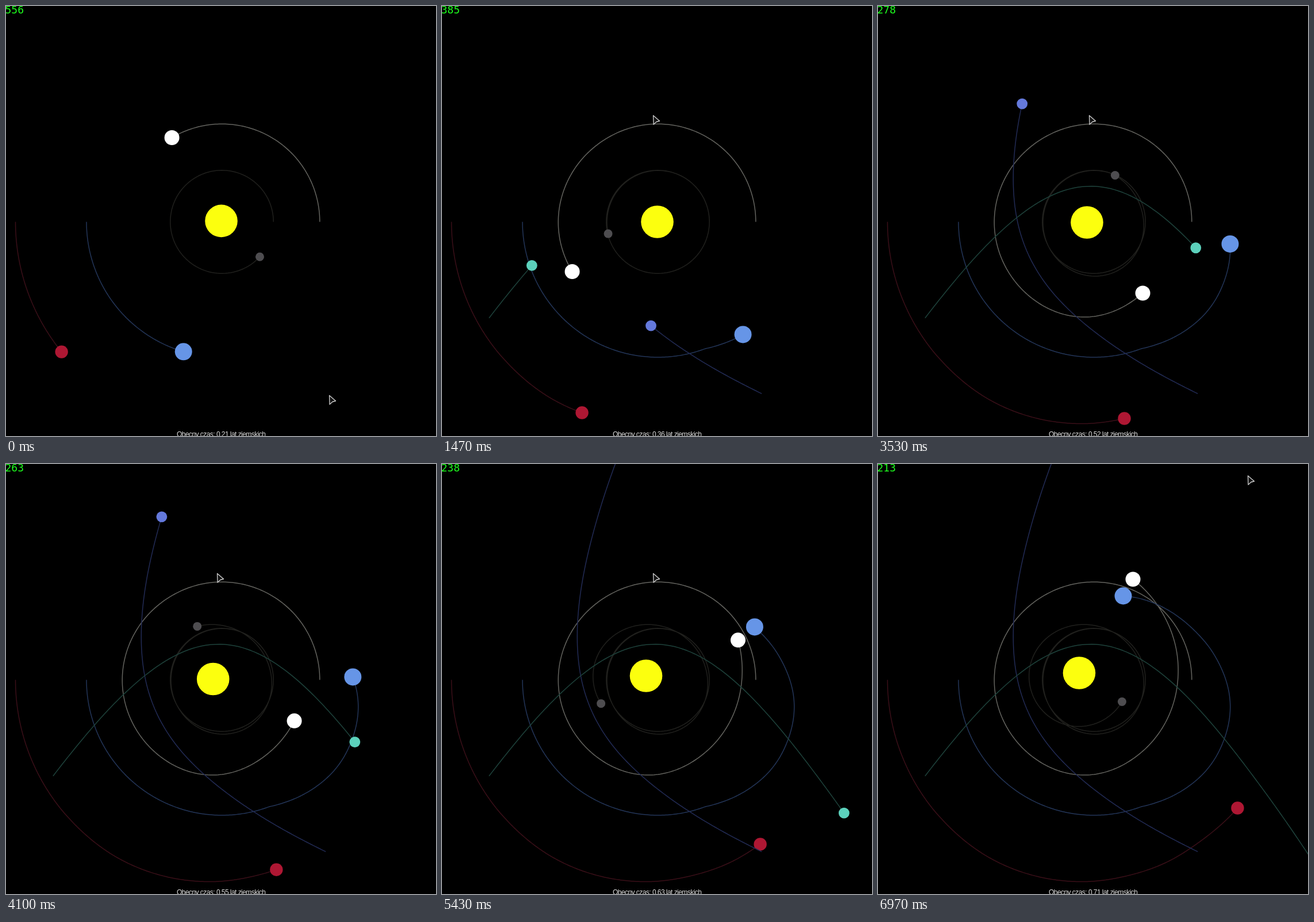
Animation, 748 px wide and 748 px high, one loop 7010 ms. Source, as an HTML page with a canvas:

```html
<!DOCTYPE html>
<html lang="pl">
<head>
<meta charset="utf-8">
<title>Orbity</title>
<style>
  html, body { margin: 0; width: 100%; height: 100%; overflow: hidden; background: #000; }
  canvas, svg { position: absolute; left: 0; top: 0; width: 748px; height: 748px; display: block; }
  #fps { font: 18px "DejaVu Sans Mono", "Noto Sans Mono", monospace; fill: #1eff1e; }
  #clock { font: 12px "Liberation Sans", Arial, sans-serif; letter-spacing: -0.55px; fill: #dcdcdc; }
</style>
</head>
<body>
<canvas id="sky" width="748" height="748"></canvas>
<svg viewBox="0 0 748 748">
  <text id="fps" x="-1.5" y="13"></text>
  <text id="clock" x="297" y="748.5"></text>
</svg>
<script>
const LOOP = 7010, STEP = 100 / 3, LAST = 209;
const TAU = 2 * Math.PI, RAD = Math.PI / 180;
const HOME = 375, AU = 235.5;
const GRAVITY = TAU * TAU * AU ** 3; // pixels cubed per year squared

const ctx = document.getElementById('sky').getContext('2d');
const fpsText = document.getElementById('fps');
const clockText = document.getElementById('clock');

// Each simulation step costs more as the trails grow, so years pass ever slower.
const stepCost = t => Math.sqrt(3.24 + 2.76 * t / 1000);
const yearAt = t => .211 + .169 * (stepCost(t) - 1.8);

const polar = (x, y, angle, r) => [x + r * Math.cos(angle), y - r * Math.sin(angle)];

// Cubic Hermite curve through rows of [p, a, b], uneven spacing.
function spline(rows) {
  const end = rows.length - 1;
  const slope = (i, k) => (rows[i + 1][k] - rows[i][k]) / (rows[i + 1][0] - rows[i][0]);
  const tangent = (i, k) => {
    if (i === 0) return slope(0, k);
    if (i === end) return slope(end - 1, k);
    const before = rows[i][0] - rows[i - 1][0], after = rows[i + 1][0] - rows[i][0];
    return (slope(i - 1, k) * after + slope(i, k) * before) / (before + after);
  };
  const tangents = rows.map((_, i) => [0, tangent(i, 1), tangent(i, 2)]);
  return p => {
    let i = 0;
    while (i < end - 1 && p >= rows[i + 1][0]) i++;
    const a = rows[i], b = rows[i + 1];
    const h = b[0] - a[0], s = (p - a[0]) / h, r = 1 - s;
    return [1, 2].map(k => a[k] * (1 + 2 * s) * r * r + b[k] * s * s * (3 - 2 * s)
      + h * s * r * (tangents[i][k] * r - tangents[i + 1][k] * s));
  };
}

// Key points of the disturbed bodies share these years.
const KEYS = [.363, .4474, .5159, .5853, .6284, .7079];
const keyed = points => points.map(([x, y], i) => [KEYS[i], x, y]);

const sunAt = spline([[0, 374, 374], [.3, 374, 374],
  ...keyed([[374, 375], [369.5, 379.5], [363, 376], [357, 371], [354.5, 368], [349.5, 363]])]);

// Steady circle until disturbed, then a curve around the drifting sun.
function planet({ start, speed, radius, until = .211, points }) {
  const circle = year => polar(HOME, HOME, (start + speed * year) * RAD, radius);
  let last = -Infinity;
  const rows = [[until, ...circle(until)], ...keyed(points)].map(([year, x, y]) => {
    const [sx, sy] = sunAt(year);
    let angle = Math.atan2(sy - y, x - sx);
    while (last > angle) angle += TAU;
    last = angle;
    return [year, angle, Math.hypot(x - sx, y - sy)];
  });
  const around = spline(rows);
  return year => year < until ? circle(year) : polar(...sunAt(year), ...around(year));
}

// Hyperbolic Kepler flight past the sun; p is the semi-latus rectum.
function flyby({ e, p, axis, nearest, mass }) {
  const a = p / (e * e - 1);
  const rate = Math.sqrt(GRAVITY * mass / a ** 3);
  const widen = Math.sqrt((e + 1) / (e - 1));
  return year => {
    const mean = (year - nearest) * rate;
    let h = Math.asinh(mean / e);
    for (let i = 0; i < 12; i++) h -= (e * Math.sinh(h) - h - mean) / (e * Math.cosh(h) - 1);
    const turn = 2 * Math.atan(widen * Math.tanh(h / 2));
    return polar(...sunAt(year), axis * RAD - turn, p / (1 + e * Math.cos(turn)));
  };
}

const bodies = [
  { born: 0, size: 28.3, color: '#fcff0e', at: sunAt },
  { born: 0, size: 7.5, color: '#4e4d50', trail: '#20201d',
    at: planet({ start: 0, speed: 1504, radius: 89.7,
      points: [[288.5, 395.5], [444, 436], [412, 294], [273.5, 326], [276, 416], [424, 413]] }) },
  { born: 0, size: 13, color: '#ffffff', trail: '#64645f',
    at: planet({ start: 0, speed: 572, radius: 170.3,
      points: [[226, 461.5], [346, 540], [460, 499], [520, 385], [514.5, 306], [443, 200]] }) },
  { born: 0, size: 15, color: '#6695e7', trail: '#233558',
    at: planet({ start: 180, speed: 348.5, radius: AU, until: .317,
      points: [[523, 571], [594.5, 495.5], [612, 413.5], [583.5, 330], [543.5, 283], [426, 229]] }) },
  { born: 0, size: 11.2, color: '#ae1733', trail: '#3a0f18',
    at: planet({ start: 180, speed: 185, radius: 359,
      points: [[243, 707], [346, 726], [428, 717], [508, 689], [553, 661], [625, 598]] }) },
  { born: .262, size: 9.4, color: '#6479dc', trail: '#222b55',
    at: flyby({ e: 1.24, p: 274, axis: -159, nearest: .423, mass: 1.01 }) },
  { born: .3105, size: 9.4, color: '#5cd1bc', trail: '#1e423b',
    at: flyby({ e: 1.155, p: 143.3, axis: 90, nearest: .448, mass: 1.05 }) }
];

// Pointer stops: arrival time and place, each reached by one quick move.
const STOPS = [[420, 557, 673], [880, 81, 544], [1370, 367, 190], [6600, 643, 20]];
const MOVE = 400;

function pointerAt(t) {
  let x = 562, y = 677;
  for (const [arrival, toX, toY] of STOPS) {
    const s = Math.min(1, Math.max(0, 1 - (arrival - t) / MOVE));
    const eased = s * s * (3 - 2 * s);
    x += (toX - x) * eased;
    y += (toY - y) * eased;
  }
  return [x, y];
}

function drawTrail(body, year) {
  ctx.beginPath();
  for (let p = body.born; p < year; p += .002) ctx.lineTo(...body.at(p));
  ctx.lineTo(...body.at(year));
  ctx.strokeStyle = body.trail;
  ctx.lineWidth = 1.5;
  ctx.stroke();
}

function drawBody(body, year) {
  if (year < body.born) return;
  if (body.trail) drawTrail(body, year);
  ctx.beginPath();
  ctx.arc(...body.at(year), body.size, 0, TAU);
  ctx.fillStyle = body.color;
  ctx.fill();
}

function drawPointer(x, y) {
  ctx.beginPath();
  for (const [dx, dy] of [[0, 0], [11, 9.5], [5.5, 11], [.5, 15.5]]) ctx.lineTo(x + dx, y + dy);
  ctx.closePath();
  ctx.fillStyle = '#141414';
  ctx.fill();
  ctx.strokeStyle = '#cfcfcf';
  ctx.lineWidth = 1.3;
  ctx.lineJoin = 'round';
  ctx.stroke();
}

function draw(now) {
  const t = Math.min(LAST, Math.floor((now % LOOP + 5) / STEP)) * STEP;
  const year = yearAt(t);
  ctx.setTransform(1, 0, 0, 1, 0, 0);
  ctx.fillStyle = '#000';
  ctx.fillRect(0, 0, 748, 748);
  ctx.translate(.5, .5);
  for (const body of bodies) drawBody(body, year);
  drawPointer(...pointerAt(t));
  // The frame rate averages ten steps, timed in whole milliseconds.
  fpsText.textContent = Math.round(10000 / Math.floor(10 * stepCost(t) + 1e-6));
  clockText.textContent = `Obecny czas: ${year.toFixed(2)} lat ziemskich`;
}

let start;
function tick(now) {
  start ??= now;
  draw(now - start);
  requestAnimationFrame(tick);
}
draw(0);
requestAnimationFrame(tick);
</script>
</body>
</html>
```
